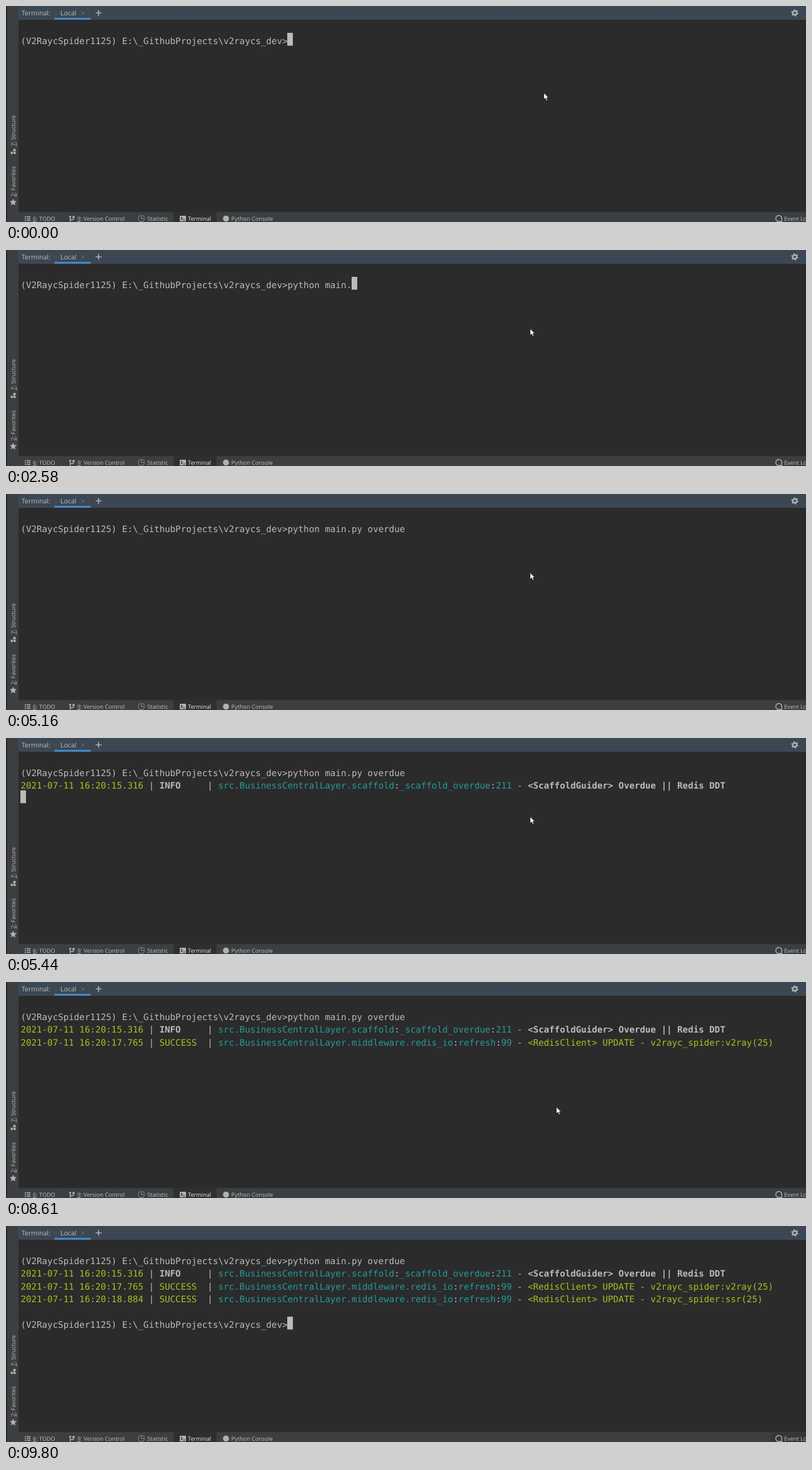
An HTML page for the animation above (9.92 s loop, 1280x346 px).

```html
<!DOCTYPE html>
<html lang="en">
<head>
<meta charset="utf-8">
<title>Terminal session</title>
<style>
html, body { margin: 0; width: 100%; height: 100%; overflow: hidden; background: #2b2b2b; }
svg { display: block; width: 1280px; height: 346px; }
text { white-space: pre; text-rendering: geometricPrecision; }
.term { font: 14.2px "DejaVu Sans Mono", monospace; fill: #bbb; }
.ui { font: 9.1px "Noto Sans", sans-serif; fill: #b4b6b8; }
.head { font-size: 10.5px; }
.key { text-decoration: underline; }
.green { fill: #a8c023; }
.cyan { fill: #299999; }
.bold { font-weight: bold; }
.icon { fill: #afb1b3; }
.line { fill: none; stroke: #afb1b3; stroke-width: 1.4; }
.off { visibility: hidden; }
</style>
</head>
<body>
<svg viewBox="0 0 1280 346">
  <rect width="1280" height="346" fill="#2b2b2b"/>
  <!-- header -->
  <rect x="20" width="1260" height="22" fill="#3c4754"/>
  <path d="M275.5 0V22M532.5 0V22M788.5 0V22M1044.5 0V22" stroke="#374350"/>
  <rect x="77.5" y="19" width="58" height="3" fill="#4a88c7"/>
  <text class="ui head" x="25" y="15">Terminal:</text>
  <text class="ui head" x="87" y="15">Local</text>
  <path class="line" d="M120 8.5l6 6m0-6l-6 6" style="stroke:#6c757d;stroke-width:1"/>
  <path class="line" d="M143.5 11h9.5M148.2 6.3v9.5" style="stroke-width:1.6"/>
  <g transform="translate(1262 11)">
    <circle class="line" r="3.1" style="stroke-width:2.4"/>
    <circle class="line" r="4.7" style="stroke-width:1.8" stroke-dasharray="2.46 2.46"/>
  </g>
  <!-- side bar -->
  <rect width="20" height="346" fill="#3c3f41"/>
  <rect width="1.6" height="346" fill="#1d1e1f"/>
  <text class="ui" transform="translate(15 224.5) rotate(-90)"><tspan class="key">7</tspan>: Structure</text>
  <text class="ui" transform="translate(15 305.5) rotate(-90)"><tspan class="key">2</tspan>: Favorites</text>
  <path class="icon" d="M11.5 229h4v3.6h-4zM7.5 233.4h3.6v3.6h-3.6zM12 233.4h3.5v3.6H12z"/>
  <path class="icon" d="M11.5 308.6l1.6 3.7 4 .4-3 2.7.9 4-3.5-2.1-3.5 2.1.9-4-3-2.7 4-.4z"/>
  <!-- status bar -->
  <rect x="1.6" y="330" width="1279" height="16" fill="#3c3f41"/>
  <rect x="20" y="329.5" width="1260" height="1" fill="#323435"/>
  <rect x="268" y="330" width="69" height="16" fill="#2d2f30"/>
  <rect id="hover" x="1224" y="330" width="56" height="16" fill="#353739"/>
  <path class="line" d="M30 337.5h2m1.2 0h6M30 340.5h2m1.2 0h6M30 343.5h2m1.2 0h6"/>
  <path class="line" d="M102.7 336v9.5M102.7 342.3h4.3q1 0 1-1.2v-3.5M106 339l2-2.4 2 2.4M101 337.5h3.4"/>
  <path class="line" d="M216.5 335.5a5 5 0 1 0 5 5h-5zM218 335.2a5 5 0 0 1 3.6 3.8" style="stroke:#8c8f91;stroke-width:1"/>
  <rect class="icon" x="278" y="336" width="10" height="9"/>
  <path d="M279.8 338l2.5 2.4-2.5 2.4M283.3 343.2h3.2" fill="none" stroke="#2d2f30" stroke-width="1.2"/>
  <circle class="icon" cx="352" cy="340.5" r="4.8"/>
  <path class="line" d="M1236.5 345.3a4.9 4.9 0 1 1 4.6-3.2v3.2z"/>
  <text class="ui" x="43" y="344"><tspan class="key">6</tspan>: TODO</text>
  <text class="ui" x="114" y="344"><tspan class="key">9</tspan>: Version Control</text>
  <text class="ui" x="226" y="344">Statistic</text>
  <text class="ui" x="291" y="344" style="fill:#dcdcdc">Terminal</text>
  <text class="ui" x="360.5" y="344">Python Console</text>
  <text class="ui" x="1245" y="344">Event Log</text>

  <g id="term"></g>
  <rect id="caret" width="9" height="20.5" fill="#bbb"/>
  <path id="pointer" d="M.5.6V11.4L3 9.1l1.7 3.8 2-.9L5 8.4h3.3z" fill="#fff" stroke="#111" stroke-width=".8"/>
</svg>
<script>
const LOOP = 9920, LEFT = 23, PITCH = 8.547, ROW = 20.45;
const PROMPT = "(V2RaycSpider1125) E:\\_GithubProjects\\v2raycs_dev>";
const COMMAND = "python main.py overdue";
const LAYER = "src.BusinessCentralLayer.";
const $ = id => document.getElementById(id);

// [time, characters typed]
const typing = [[0, 0], [400, 1], [560, 2], [710, 3], [870, 4], [1020, 6], [1180, 7],
  [1610, 8], [1740, 9], [2160, 10], [2300, 11], [2580, 12], [2870, 14], [3000, 15],
  [3690, 17], [3910, 19], [4320, 20], [4460, 22]];
// [time, caret row], -1 is hidden
const caretRows = [[0, 0], [4600, 1], [5160, -1], [5440, 2], [6420, -1], [6940, 2],
  [7360, -1], [7780, 3], [8610, -1], [8890, 4], [9030, 5]];
// [time, [x, y]], null is hidden
const pointerSpots = [[0, [860, 138.5]], [120, [838, 125.3]], [8610, [880, 199.5]],
  [8750, null], [9580, [1234, 323.5]], [9800, null]];
const HOVER_START = 9580;

function addLine(row, spans) {
  const text = document.createElementNS("http://www.w3.org/2000/svg", "text");
  text.setAttribute("class", "term");
  text.setAttribute("x", LEFT + 0.4);
  text.setAttribute("y", 61 + Math.round(row * ROW));
  for (const [content, style = ""] of spans) {
    const span = document.createElementNS("http://www.w3.org/2000/svg", "tspan");
    span.setAttribute("class", style);
    span.textContent = content;
    text.append(span);
  }
  $("term").append(text);
  return text;
}

function addLog(row, clock, level, place, message, style) {
  const spans = [["2021-07-11 16:20:" + clock, "green"], [" | "], [level.padEnd(8), style], [" | "]];
  place.forEach((part, i) => spans.push([i ? ":" : ""], [part, "cyan"]));
  return addLine(row, [...spans, [" - "], [message, style]]);
}

const client = [LAYER + "middleware.redis_io", "refresh", "99"];
const input = addLine(0, [[PROMPT], [""]]).lastChild;
const output = [
  [5300, addLog(1, "15.316", "INFO", [LAYER + "scaffold", "_scaffold_overdue", "211"],
    "<ScaffoldGuider> Overdue || Redis DDT", "bold")],
  [7780, addLog(2, "17.765", "SUCCESS", client, "<RedisClient> UPDATE - v2rayc_spider:v2ray(25)", "green")],
  [8750, addLog(3, "18.884", "SUCCESS", client, "<RedisClient> UPDATE - v2rayc_spider:ssr(25)", "green")],
  [9030, addLine(5, [[PROMPT]])],
  [HOVER_START, $("hover")]
];

const valueAt = (steps, t) => steps.filter(([start]) => start <= t).pop()[1];
const show = (node, on) => node.classList.toggle("off", !on);
const place = (node, x, y) => node.setAttribute("transform", `translate(${x} ${y})`);

function draw(t) {
  const typed = valueAt(typing, t);
  input.textContent = COMMAND.slice(0, typed);
  for (const [start, node] of output) show(node, t >= start);

  const row = valueAt(caretRows, t);
  const column = row === 0 ? PROMPT.length + typed : row === 5 ? PROMPT.length : 0;
  show($("caret"), row >= 0);
  place($("caret"), Math.round(LEFT + column * PITCH), 43 + row * ROW);

  const spot = valueAt(pointerSpots, t);
  show($("pointer"), spot);
  if (spot) place($("pointer"), ...spot);
}

const begin = performance.now();
function tick() {
  draw((performance.now() - begin) % LOOP);
  requestAnimationFrame(tick);
}
tick();
</script>
</body>
</html>
```
